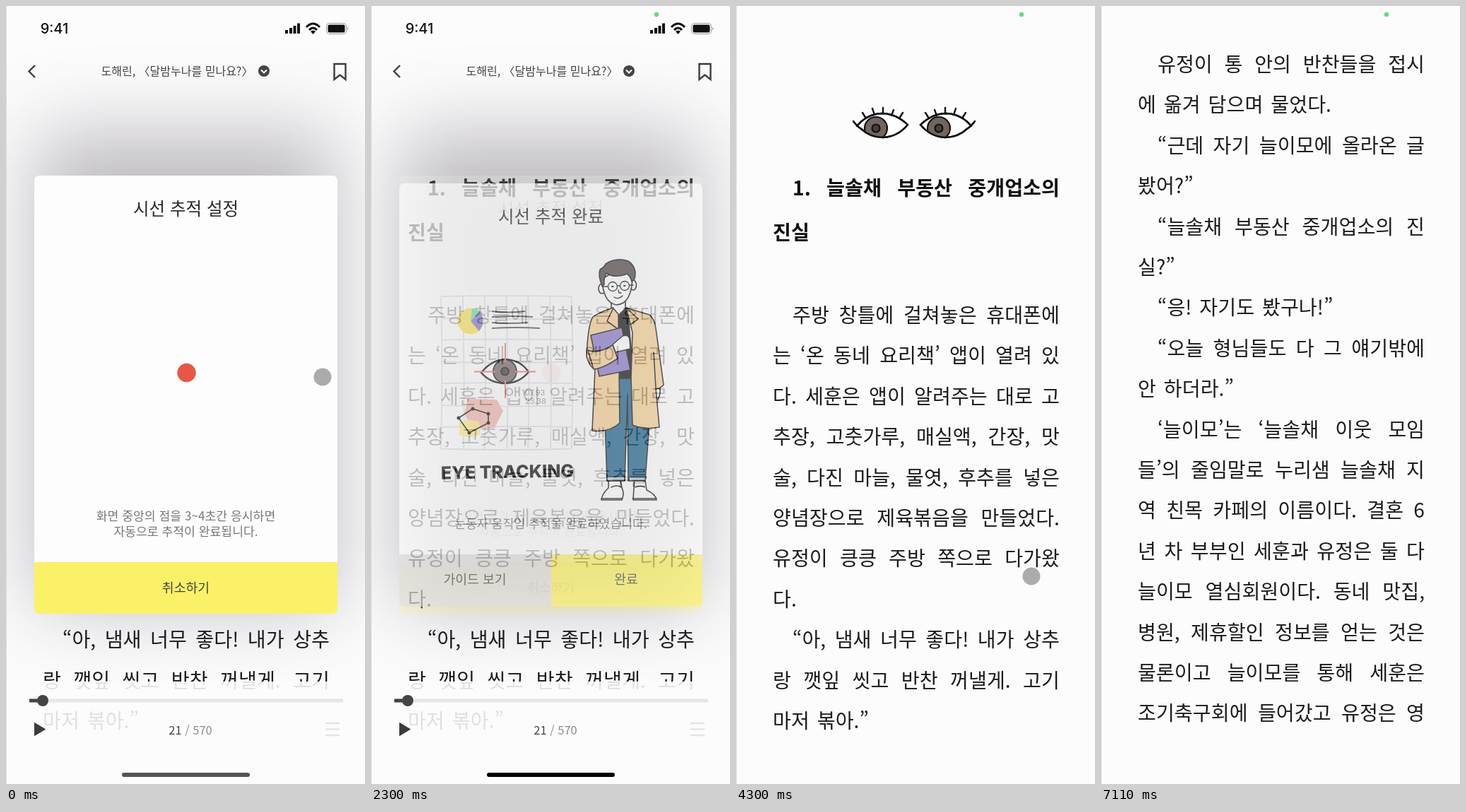
Recreate the animation shown at these times as an HTML page. Size 508 by 1101 pixels, loop 8.07 s.

```html
<!DOCTYPE html>
<html lang="ko">
<head>
<meta charset="utf-8">
<title>시선 추적</title>
<style>
html, body { margin: 0; width: 100%; height: 100%; overflow: hidden; background: #fdfcfd; }
#stage {
  position: relative; width: 508px; height: 1101px; overflow: hidden; background: #fdfcfd;
  font-family: "Noto Sans CJK KR", "Noto Sans CJK JP", sans-serif;
}
#stage > * { position: absolute; left: 0; top: 0; }
.page { width: 508px; height: 1101px; }
.line {
  position: absolute; left: 52px; width: 406px; height: 58px; line-height: 58px; box-sizing: border-box;
  font-size: 28.2px; font-weight: 300; color: #1c1b1d; word-spacing: 3px;
  white-space: nowrap; text-align: justify; text-align-last: justify;
}
.line.indent { padding-left: 28px; }
.line.end { text-align-last: left; }
.line.heading { font-weight: 700; color: #111; }
#stage > .shadow {
  left: 40px; top: 180px; width: 428px; height: 670px;
  background: rgba(35, 33, 42, .29); filter: blur(58px);
}
text { text-anchor: middle; fill: #444; }
.title { font-size: 24.5px; font-weight: 500; fill: #2c2b2d; }
.note { font-size: 17.2px; font-weight: 350; fill: #777; }
.button { font-size: 18.3px; }
.ink { stroke: #151515; stroke-width: 1.6; stroke-linejoin: round; stroke-linecap: round; }
.icon { fill: none; stroke: #3c3b3d; stroke-width: 2.4; }

.shadow, .chrome, .eyes, .iris, .home, .camera, .setup, .done, .arrow, .grow, .touch, .first, .second {
  animation: 8070ms linear infinite both;
}
.shadow { animation-name: close; }
.chrome { animation-name: chrome; }
.eyes { animation-name: eyes; }
.iris { animation-name: look; }
.home { animation-name: home; }
.camera { animation-name: camera; }
.setup { animation-name: setup; }
.done { animation-name: done; }
.arrow { animation-name: arrow; }
.grow { animation-name: grow; transform-box: fill-box; transform-origin: center; }
.touch { animation-name: touch; }
.first { animation-name: first; }
.second { animation-name: second; }

@keyframes close { 0%, 43.4% { opacity: 1 } 46.1%, 100% { opacity: 0 } }
@keyframes chrome { 0%, 47.1% { opacity: 1 } 50.2%, 100% { opacity: 0 } }
@keyframes eyes { 0%, 48% { opacity: 0 } 51%, 100% { opacity: 1 } }
@keyframes look {
  0%, 57% { transform: translateX(-15px); animation-timing-function: ease-in-out }
  61.3%, 100% { transform: none }
}
@keyframes home { 0% { fill: #555356 } 8%, 100% { fill: #000 } }
@keyframes camera { 0%, 15.4% { opacity: 0 } 16%, 100% { opacity: 1 } }
@keyframes setup { 0%, 26.3% { opacity: 1 } 29%, 100% { opacity: 0 } }
@keyframes done { 0%, 26.5% { opacity: 0 } 29.6%, 43.4% { opacity: 1 } 46.1%, 100% { opacity: 0 } }
@keyframes arrow { 0%, 58.2% { opacity: 0 } 60.7%, 84% { opacity: 1 } 86.5%, 100% { opacity: 0 } }
@keyframes grow { 0%, 67.5% { transform: none } 71.2%, 100% { transform: scale(1.19) } }
@keyframes touch {
  0%, 18% { transform: translate(448px, 525px); opacity: 1 }
  20% { transform: translate(450px, 524px); opacity: 0 }
  20.01%, 35.9% { transform: translate(420px, 807px); opacity: 0 }
  37.8%, 41.5% { transform: translate(420px, 807px); opacity: 1 }
  45%, 75.6% { transform: translate(418px, 807px); opacity: 1 }
  78%, 100% { transform: translate(418px, 807px); opacity: 0 }
}
@keyframes first { 0%, 84% { opacity: 1 } 86.5%, 100% { opacity: 0 } }
@keyframes second { 0%, 84% { opacity: 0 } 86.5%, 100% { opacity: 1 } }
</style>
</head>
<body>
<div id="stage">
  <div class="page first" id="opening"></div>
  <div class="page second" id="following"></div>
  <div class="shadow"></div>

  <svg width="508" height="1101" viewBox="0 0 508 1101">
    <defs>
      <path id="eyeShape" d="M-38 -5 Q-32 3 -28 5 Q-14 18 4 18 Q25 17 39 0 Q22 -16 2 -16 Q-19 -15 -33 2"/>
      <clipPath id="leftLid"><use href="#eyeShape" x="204" y="168"/></clipPath>
      <clipPath id="rightLid"><use href="#eyeShape" transform="translate(300 168) scale(-1 1)"/></clipPath>
      <g id="lashes"><use href="#eyeShape"/><path d="M-20 -9l-5 -8M-8 -14l-3 -9M4 -16v-8M16 -13l3 -8M27 -9l5 -8"/></g>
      <g id="iris" stroke="#111" stroke-width="2.2"><circle r="16" fill="#71655f"/><circle r="5.5" fill="#463f3c"/></g>
    </defs>
    <path d="M.5 0V1101" stroke="#dddbde"/>

    <!-- Eyes above the page -->
    <g class="first">
      <g class="eyes">
        <g fill="#fff" stroke="#111" stroke-width="2.4" stroke-linecap="round">
          <use href="#lashes" x="204" y="168"/>
          <use href="#lashes" transform="translate(300 168) scale(-1 1)"/>
        </g>
        <g clip-path="url(#leftLid)"><g class="iris"><use href="#iris" x="213" y="173"/></g></g>
        <g clip-path="url(#rightLid)"><g class="iris"><use href="#iris" x="302" y="173"/></g></g>
        <g fill="none" stroke="#111" stroke-width="2.4">
          <use href="#eyeShape" x="204" y="168"/>
          <use href="#eyeShape" transform="translate(300 168) scale(-1 1)"/>
        </g>
      </g>
    </g>
    <g class="arrow" fill="none" stroke="#fff" stroke-width="3.4">
      <circle cx="52" cy="114" r="28" fill="#dcdadd" stroke="none"/><path d="M57 105l-9 9 9 9"/>
      <g class="grow"><circle cx="457" cy="114" r="28" fill="#dcdadd" stroke="none"/><path d="M453 105l9 9 -9 9"/></g>
    </g>

    <!-- Reader controls -->
    <g class="chrome">
      <g fill="#111">
        <text x="68.5" y="39" font-family="Inter, sans-serif" font-size="20" font-weight="500" style="fill:#111">9:41</text>
        <path d="M395 34h4v5h-4zM401 31h4v8h-4zM406.500 28h4v11h-4zM412 24.500h4v14.500h-4z"/>
        <path d="M425 30Q434.500 20 444 30M429 34Q434.500 28 440 34" fill="none" stroke="#111" stroke-width="3"/>
        <path d="M431 36Q434.500 33 438 36L434.500 40z"/>
        <rect x="453.500" y="24.500" width="28" height="15" rx="4" fill="none" stroke="#999"/>
        <rect x="455.500" y="26.500" width="24" height="11" rx="2"/><path d="M483 29.500q3 2.500 0 5z" fill="#999"/>
      </g>
      <g class="icon">
        <path d="M41 84l-8.500 8.500 8.500 8.500"/>
        <path d="M464.500 82h16v22l-8 -6.500 -8 6.500z"/>
        <path d="M452 1015h20M452 1023.500h20M452 1032h20"/>
      </g>
      <text x="242" y="98" font-size="16" font-weight="500">도해린, 〈달밤누나를 믿나요?〉</text>
      <circle cx="365" cy="92" r="8" fill="#444"/><path d="M361 90.500l4 4 4 -4" fill="none" stroke="#fff" stroke-width="2"/>
      <path d="M1 956H508V1101H1z" fill="#fdfcfd" opacity=".88"/>
      <path d="M33 983H477" stroke="#e7e5e8" stroke-width="5"/>
      <path d="M33 983H48" stroke="#444" stroke-width="5"/><circle cx="52" cy="983" r="8" fill="#444"/>
      <path d="M40.500 1014.500l15 9 -15 9z" fill="#3c3b3d" stroke="#3c3b3d" stroke-linejoin="round"/>
      <text x="261" y="1030.500" font-size="16.500" font-weight="500">21<tspan fill="#8c8a8d"> / 570</tspan></text>
      <rect class="home" x="164" y="1085" width="181" height="6" rx="3"/>
    </g>
    <circle class="camera" cx="404" cy="12" r="3.200" fill="#5fdc7d"/>

    <!-- Calibration dialog -->
    <g class="setup">
      <rect x="40" y="240" width="429" height="620" rx="7" fill="#fdfdfd"/>
      <path d="M40 787H469V853a7 7 0 0 1 -7 7H47a7 7 0 0 1 -7 -7z" fill="#fbf168"/>
      <text class="title" x="254.500" y="296">시선 추적 설정</text>
      <circle cx="255.500" cy="519" r="13.200" fill="#e65746"/>
      <text class="note" x="254.500" y="728">화면 중앙의 점을 3~4초간 응시하면</text>
      <text class="note" x="254.500" y="750">자동으로 추적이 완료됩니다.</text>
      <text class="button" x="254.500" y="829.500">취소하기</text>
    </g>

    <!-- Completion dialog -->
    <g class="done">
      <rect x="40" y="251" width="429" height="599" rx="7" fill="#fdfdfd"/>
      <path d="M40 776H255V850H47a7 7 0 0 1 -7 -7z" fill="#dfdde0"/>
      <path d="M255 776H469V843a7 7 0 0 1 -7 7H255z" fill="#fbf168"/>
      <text class="title" x="254.500" y="307">시선 추적 완료</text>
      <text class="note" x="254.500" y="739">눈동자 움직임 추적을 완료하였습니다.</text>
      <text class="button" x="147" y="818">가이드 보기</text>
      <text class="button" x="361" y="818">완료</text>

      <path id="grid" fill="none" stroke="#e0dfe2" stroke-width="1.700"/>
      <circle cx="141" cy="446" r="18.500" fill="#fae463"/>
      <path d="M141 446L154 432Q163 446 153 460z" fill="#8a7bcb"/>
      <path d="M141 446L143 428Q150 428 154 432z" fill="#72e0a8"/>
      <path d="M171 432q24 3 47 0M171 440q30 -2 58 0M171 448q26 2 51 0M171 456q35 -2 68 0" fill="none" stroke="#555" stroke-width="2"/>
      <path d="M156 519Q170 501 190 500Q212 501 223 518Q210 534 188 534Q168 533 156 519z" fill="#fff" class="ink" style="stroke-width:2.400"/>
      <g class="ink"><circle cx="189.500" cy="517" r="16.500" fill="#776a66"/><circle cx="189.500" cy="517" r="5.500" fill="#443c3a"/></g>
      <path d="M190 477v27M190 530v25M146 517.500h30M204 517.500h29" stroke="#ed7863" stroke-width="2"/>
      <g font-family="Inter, sans-serif" font-size="11">
        <text x="230" y="551" style="fill:#999">107.93</text><text x="233" y="563" style="fill:#999">23.38</text>
      </g>
      <path d="M137 556L178 557 187 573 175 597 143 599 132 577z" fill="#f3b8b0"/>
      <path d="M124 590l12 -5 17 3 2 18 -16 5 -14 -4z" fill="#faef82" opacity=".85"/>
      <path d="M124 583L144 570 166 577 166 590 139 604z" fill="none" class="ink"/>
      <path d="M124 583h0M144 570h0M166 577h0M166 590h0M139 604h0" stroke="#111" stroke-width="5" stroke-linecap="round"/>
      <text x="193" y="668" font-family="Inter, sans-serif" font-size="25" font-weight="800" transform="rotate(-1 193 660)" style="fill:#111">EYE TRACKING</text>

      <g class="ink" fill="#fff">
        <path d="M336 664v18q-9 8 -10 17h29q4 -10 0 -17l-3 -18zM373 664l-2 35h33q-1 -8 -14 -14l-3 -21z"/>
        <path d="M326 697h30M370 697h34M340 681q8 -4 14 0M374 681q8 -3 13 0" fill="none"/>
        <path d="M402 538q-1 17 3 19 5 -4 4 -19z"/>
        <path d="M329 526H392L394 588 388 672H364L363 550 359 672H334z" fill="#1d628b"/>
        <path d="M334 666h25v6h-25zM365 666h24l-1 6h-23z" fill="#a9cbdc"/>
        <path d="M340 430L363 428 372 527H338z" fill="#111"/>
        <path d="M340 416v14l9 9 11 -11v-14z"/>
        <path d="M342 427Q320 435 314 440 307 450 305 496 310 512 317 514L313 601Q337 604 352 590L350 436z" fill="#f6d195"/>
        <path d="M361 427L394 437Q401 442 403 456L414 536Q408 543 403 541L408 596Q388 600 370 593L368 526 370 462z" fill="#f6d195"/>
        <path d="M400 490l3 51M343 427l-9 19 15 11M361 427l17 16 -11 8" fill="none"/>
        <path d="M311 466L355 455 367 515 323 524z" fill="#8a7bcb"/>
        <path d="M342 479L356 467Q365 464 366 472L367 485 346 490z"/>
        <path d="M307 487Q320 493 342 480L349 499Q328 513 315 514z" fill="#f6d195"/>
        <ellipse cx="327" cy="400" rx="5" ry="7"/><ellipse cx="371" cy="395" rx="4.500" ry="7"/>
        <path d="M327 386Q328 419 347 423 370 422 370 380L350 373z"/>
        <path d="M327 396Q321 381 324 373 331 369 332 365 347 355 364 361 377 370 373 386L369 390Q367 382 362 379 345 386 333 378 329 386 330 394z" fill="#514845"/>
        <g fill="none" style="stroke-width:1.300">
          <circle cx="342" cy="397" r="6.500"/><circle cx="359" cy="396" r="6.500"/>
          <path d="M348.500 396h4M327 397l8 0M366 395h5M344 412q6 4 12 -2M350 402l1 4h3"/>
        </g>
        <path d="M341 397h1.500M358 396h1.500" style="stroke-width:2.200"/>
      </g>
    </g>

    <circle class="touch" r="12.500" fill="#000" fill-opacity=".32"/>
  </svg>
</div>
<script>
const PITCH = 57.4;

// A leading space indents the line; a trailing bar ends the paragraph.
function addLines(id, lines, firstCentre, pitch = PITCH, style = "") {
  lines.forEach((source, i) => {
    const line = document.createElement("div");
    line.className = `line ${style}`;
    line.classList.toggle("indent", source.startsWith(" "));
    line.classList.toggle("end", source.endsWith("|"));
    line.textContent = source.replace("|", "").trim();
    line.style.top = `${firstCentre + i * pitch - 31}px`;
    document.getElementById(id).append(line);
  });
}

addLines("opening", [" 1. 늘솔채 부동산 중개업소의", "진실|"], 258, 63, "heading");
addLines("opening", [
  " 주방 창틀에 걸쳐놓은 휴대폰에",
  "는 ‘온 동네 요리책’ 앱이 열려 있",
  "다. 세훈은 앱이 알려주는 대로 고",
  "추장, 고춧가루, 매실액, 간장, 맛",
  "술, 다진 마늘, 물엿, 후추를 넣은",
  "양념장으로 제육볶음을 만들었다.",
  "유정이 킁킁 주방 쪽으로 다가왔",
  "다.|",
  " “아, 냄새 너무 좋다! 내가 상추",
  "랑 깻잎 씻고 반찬 꺼낼게. 고기",
  "마저 볶아.”|"
], 438);
addLines("following", [
  " 유정이 통 안의 반찬들을 접시",
  "에 옮겨 담으며 물었다.|",
  " “근데 자기 늘이모에 올라온 글",
  "봤어?”|",
  " “늘솔채 부동산 중개업소의 진",
  "실?”|",
  " “응! 자기도 봤구나!”|",
  " “오늘 형님들도 다 그 얘기밖에",
  "안 하더라.”|",
  " ‘늘이모’는 ‘늘솔채 이웃 모임",
  "들’의 줄임말로 누리샘 늘솔채 지",
  "역 친목 카페의 이름이다. 결혼 6",
  "년 차 부부인 세훈과 유정은 둘 다",
  "늘이모 열심회원이다. 동네 맛집,",
  "병원, 제휴할인 정보를 얻는 것은",
  "물론이고 늘이모를 통해 세훈은",
  "조기축구회에 들어갔고 유정은 영"
], 83);

let grid = "";
for (let i = 0; i < 7; i++) grid += `M${99 + i * 30.8} 411q3 108 ${i % 2} 216`;
for (let i = 0; i < 8; i++) grid += `M99 ${411 + i * 30.8}q92 ${i % 2 ? 3 : -2} 185 0`;
document.getElementById("grid").setAttribute("d", grid);
</script>
</body>
</html>
```
